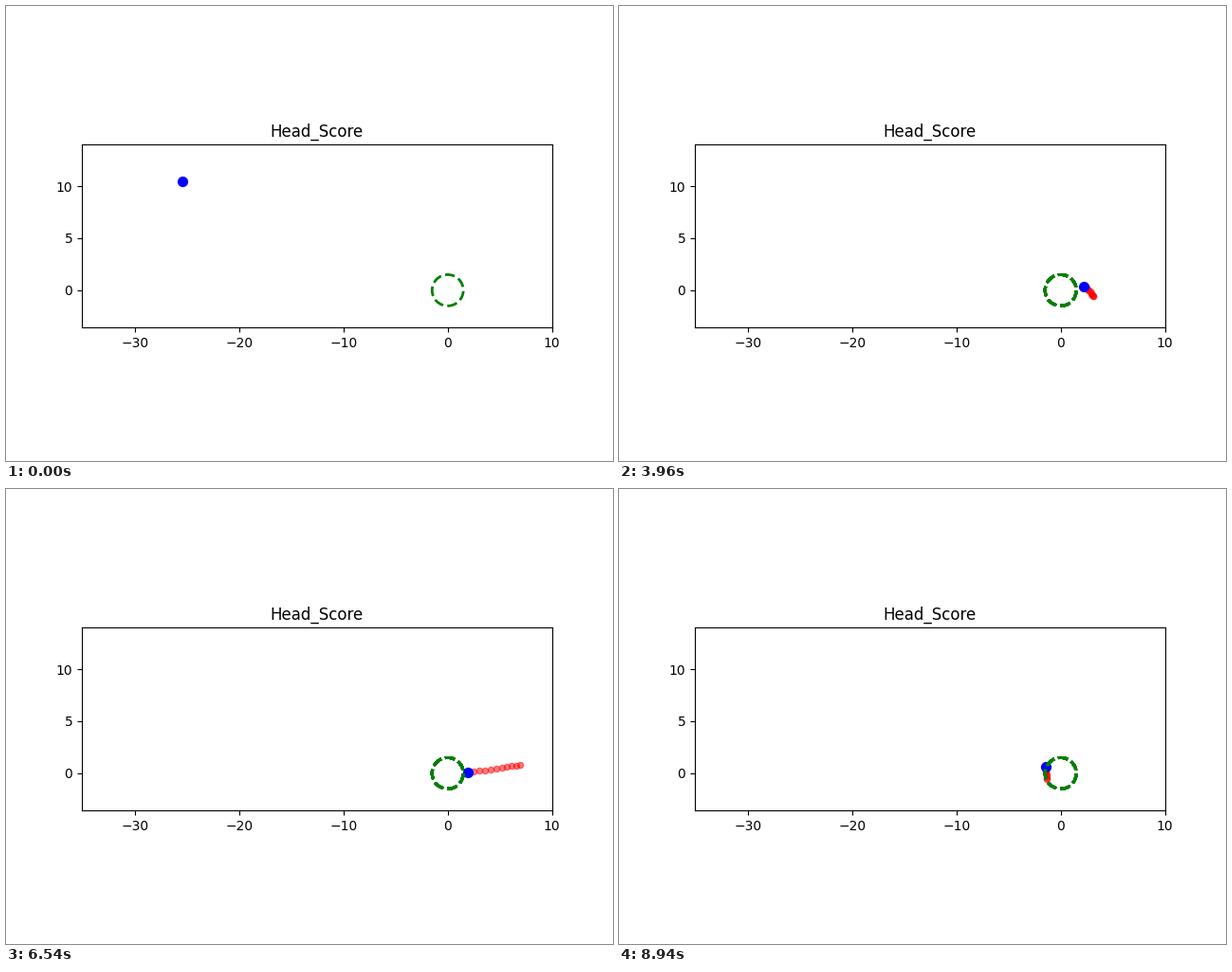
Animation of 640 by 480 pixels, one loop 8970 ms. Source, as a matplotlib script:

```python
import numpy as np
import matplotlib.pyplot as plt
from matplotlib.animation import FuncAnimation

FRAMES, STEP_MS = 299, 30
TAIL = 10          # past positions kept on screen
LAYERS = 60        # the ring is stamped again on each step, which hardens its edge
ARRIVAL = 90       # step at which the head reaches the ring

# step, x, y
APPROACH = [(0, -25.5, 10.45), (21, -33.05, 10.8), (36, -26.6, 11.65),
            (41, -22.15, 11.65), (46, -19.6, 12.15), (50, -19.3, 11.1),
            (61, -16.0, 5.3), (72, -11.3, 0.07), (78, -6.35, -1.3),
            (82, -3.4, -0.9)]
HOVER = [(ARRIVAL, 0.55, -0.2), (105, 2.2, 0.8), (122, 3.1, -0.6),
         (132, 2.25, 0.33), (153, -1.05, 0.4), (158, 0.8, -0.95),
         (165, 3.1, 1.2), (178, 1.35, 0.7), (187, 0.73, 1.75),
         (230, -0.5, -0.6), (240, -0.75, -0.9), (285, -1.35, -0.75),
         (298, -1.4, 0.6)]


def ease_through(t, tk, vk):
    """Cubic curve through the keys that never overshoots them."""
    d = np.diff(vk) / np.diff(tk)
    a, b = d[:-1], d[1:]
    same = a * b > 0
    inner = np.where(same, 2 * a * b / np.where(same, a + b, 1), 0)
    slope = np.concatenate([[0], inner, [0]])
    k = np.clip(np.searchsorted(tk, t, side="right") - 1, 0, len(d) - 1)
    h = tk[k + 1] - tk[k]
    s = (t - tk[k]) / h
    return (vk[k] + (vk[k + 1] - vk[k]) * s * s * (3 - 2 * s)
            + h * s * (1 - s) * (slope[k] * (1 - s) - slope[k + 1] * s))


def pulse(t, start, length):
    """Smooth rise from 0 to 1 and back."""
    return np.sin(np.pi * np.clip((t - start) / length, 0, 1)) ** 2


def head_path(t):
    tk, xk, yk = np.array(APPROACH + HOVER, dtype=float).T
    wiggle = pulse(t, 10, 85) * np.cos(2 * np.pi * (t - 37) / 3.167)
    right, left = pulse(t, 181, 45), pulse(t, 239, 45)
    x = ease_through(t, tk, xk) + 7.6 * right - 14 * left
    y = ease_through(t, tk, yk) - 0.45 * wiggle + 2.1 * left
    return np.column_stack([x, y])


path = head_path(np.arange(FRAMES))

fig, ax = plt.subplots(figsize=(6.4, 4.8), dpi=100)
ax.set_aspect("equal")
ax.set_xlim(-35.13, 10.045)
ax.set_ylim(-3.55, 14.02)
ax.set_xticks(range(-30, 11, 10))
ax.set_yticks([0, 5, 10])
ax.set_title("Head_Score")

trace, = ax.plot([], [], color="black", lw=0.7, zorder=1)
tail = ax.scatter([], [], s=20, color="red", alpha=0.5, zorder=1)
head = ax.scatter([], [], s=50, color="blue", zorder=1)
rings = [ax.add_patch(plt.Circle((0, 0), 1.5, fill=False, color="green",
                                 ls="--", lw=2, zorder=1))
         for _ in range(LAYERS)]


def update(i):
    head.set_offsets(path[i:i + 1])
    tail.set_offsets(path[max(0, i - TAIL):i])
    recent = path[max(0, i - 2):i + 1] if i < ARRIVAL else path[:0]
    trace.set_data(*recent.T)
    for k, ring in enumerate(rings):
        ring.set_visible(k <= i)
    return [trace, tail, head, *rings]


anim = FuncAnimation(fig, update, frames=FRAMES, interval=STEP_MS,
                     repeat=True, repeat_delay=0)
plt.show()
```
